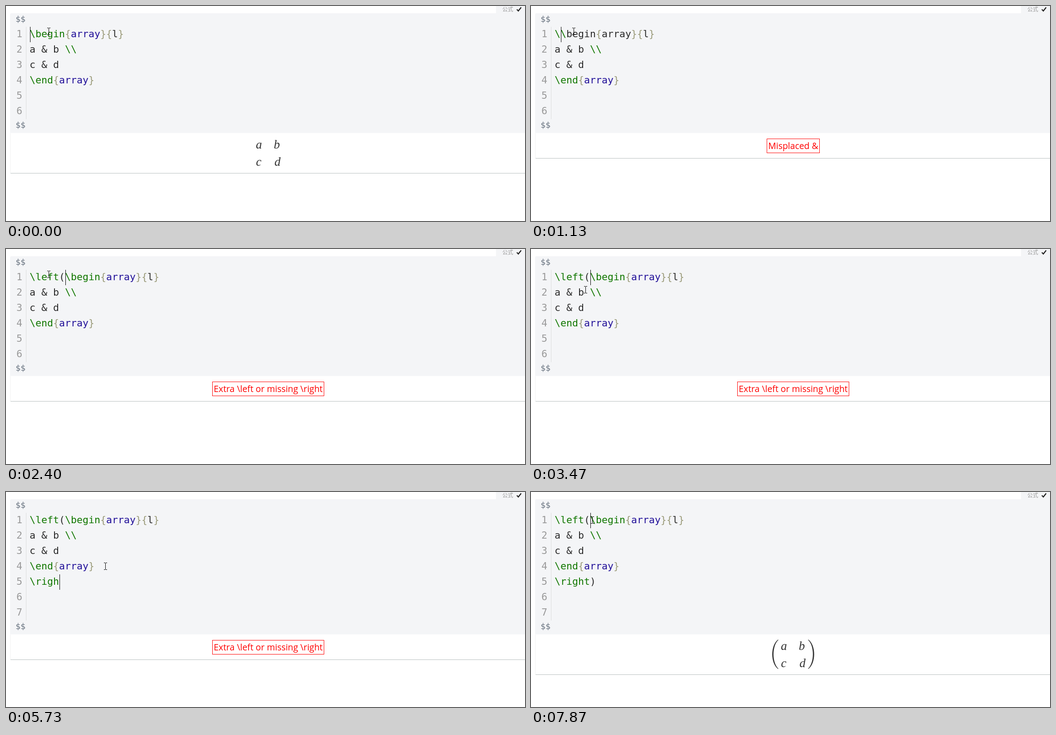
Animation, 1145 px wide and 475 px high, one loop 8000 ms. Source, as an HTML page:

```html
<!DOCTYPE html>
<html lang="en">
<head>
<meta charset="utf-8">
<title>Formula editor</title>
<style>
  html, body { margin: 0; width: 100%; height: 100%; overflow: hidden; background: #fff; }
  svg { display: block; position: absolute; left: 0; top: 0; }
  text { white-space: pre; }
  .code, .num { font: 21.6px "DejaVu Sans Mono", monospace; }
  .code { fill: #2b2b2b; }
  .num { fill: #999; text-anchor: end; }
  .fence { font: 18.3px "DejaVu Sans Mono", monospace; fill: #697480; }
  .tag { fill: #170; }
  .brace { fill: #997; }
  .atom { fill: #219; }
  .var { font: italic 27px "Liberation Serif", serif; fill: #333; text-anchor: middle; }
  .bad { font: 27px "Liberation Serif", serif; fill: #f00; }
  .slash { font-size: 38px; }
  .err { position: absolute; left: 0; right: -12px; width: fit-content; margin: 0 auto;
    box-sizing: border-box; height: 32px; padding: 0 2px; border: 1px solid #f00; color: #f00;
    white-space: pre; font: 19.4px/30px "Open Sans", sans-serif; }
  .label { font: 300 12px "Noto Sans CJK SC", "Noto Sans CJK", sans-serif; fill: #999; }
</style>
</head>
<body>
<svg id="stage" width="1145" height="475" viewBox="0 0 1145 475"></svg>
<div id="err" class="err"></div>
<svg width="1145" height="475" viewBox="0 0 1145 475">
  <path id="mouse" d="M0 0h3v1h-3zM4 0h3v1h-3zM3 1h1v14h-1zM0 15h3v1h-3zM4 15h3v1h-3z"/>
</svg>
<script>
const LOOP = 8000, ROW = 34, TOP = 46, LEFT = 53, CHAR = 13, TICK = 200 / 3;
const stage = document.getElementById('stage');
const errBox = document.getElementById('err');
const mouse = document.getElementById('mouse');

// Each step merges into the state; caret is [row, column] or null.
const steps = [
  [0, { head: '', tail: null, caret: [0, 0] }],
  [330, { head: '\\', caret: [0, 1] }],
  [600, { head: '', caret: [0, 0] }],
  [1130, { head: '\\', caret: [0, 1] }],
  [1330, { head: '\\l', caret: [0, 2] }],
  [1470, { head: '\\le', caret: [0, 3] }],
  [1530, { head: '\\lef', caret: [0, 4] }],
  [1670, { head: '\\left', caret: [0, 5] }],
  [2200, { caret: null }],
  [2400, { head: '\\left(', caret: [0, 6] }],
  [2930, { caret: null }],
  [3470, { caret: [0, 6] }],
  [3930, { caret: [3, 11] }],
  [4530, { caret: null }],
  [4670, { tail: '', caret: [4, 0] }],
  [5200, { caret: null }],
  [5270, { tail: '\\', caret: [4, 1] }],
  [5470, { tail: '\\r', caret: [4, 2] }],
  [5530, { tail: '\\ri', caret: [4, 3] }],
  [5670, { tail: '\\rig', caret: [4, 4] }],
  [5730, { tail: '\\righ', caret: [4, 5] }],
  [5800, { tail: '\\right', caret: [4, 6] }],
  [6330, { caret: null }],
  [6600, { tail: '\\right)', caret: [4, 7] }],
  [7130, { caret: null }],
  [7670, { caret: [4, 7] }],
  [7870, { caret: [0, 6] }]
];

// Pointer strokes: start time, then one position per tick.
const strokes = [
  [0, [[94, 48]]],
  [2930, [[108, 45], [132, 39], [148, 37], [150, 37]]],
  [3270, [[146, 41], [136, 50], [126, 64], [120, 82], [124, 102], [138, 122],
          [160, 138], [184, 149], [203, 155], [214, 156], [217, 156]]],
  [4130, [[219, 156]]],
  [7270, [[222, 157], [224, 155], [220, 146], [208, 130], [192, 112],
          [174, 93], [157, 76], [144, 63], [137, 56], [135, 54]]]
];

const esc = s => s.replace(/&/g, '&amp;');
const span = (cls, s) => `<tspan class="${cls}">${esc(s)}</tspan>`;
const text = (cls, x, y, s) => `<text class="${cls}" x="${x}" y="${y}">${s}</text>`;
const rect = (x, y, w, h, fill) => `<rect x="${x}" y="${y}" width="${w}" height="${h}" fill="${fill}"/>`;

function highlight(line) {
  const rule = /(\\[a-z]+)(?:\{(\w+)\})?|\\\\|[{}]|[^\\{}]+|\\/g;
  return line.replace(rule, (all, cmd, arg) => {
    if (cmd) return span('tag', cmd) + (arg ? span('brace', '{') + span('atom', arg) + span('brace', '}') : '');
    if (all === '\\\\') return span('tag', all);
    return /[{}]/.test(all) ? span('brace', all) : esc(all);
  });
}

function errorFor({ head, tail }) {
  const missing = 'Missing or unrecognized delimiter for ';
  if (head === '\\') return 'Misplaced &';
  if (head === '\\left') return missing + head;
  if (head !== '\\left(' || tail === '\\right)') return '';
  return tail === '\\right' ? missing + tail : 'Extra \\left or missing \\right';
}

function matrix(head, y) {
  const paren = head === '\\left(';
  const bad = paren ? '' : head.slice(1);
  const advance = { l: 7.5, e: 12, f: 8 };
  const width = bad ? [...bad].reduce((w, c) => w + advance[c], 13.5) : 0;
  const shift = width / 2;
  let out = [['a', 558, 34], ['b', 597.5, 34], ['c', 557.5, 72], ['d', 599, 72]]
    .map(([c, x, dy]) => text('var', x + shift, y + dy, c)).join('');
  if (bad) {
    const x = 548 - shift;
    out += text('bad slash', x, y + 58, '\\') + text('bad', x + 13.5, y + 51, bad);
  }
  if (paren) {
    const arc = 'M545 11C528 24 528 63 545 76L545.8 75.2C531.5 62 531.5 25 545.8 11.8Z';
    out += `<g fill="#333" transform="translate(0 ${y})"><path d="${arc}"/>` +
      `<path d="${arc}" transform="translate(1157 0) scale(-1 1)"/></g>`;
  }
  return out;
}

function draw(s) {
  const lines = [s.head + '\\begin{array}{l}', 'a & b \\\\', 'c & d', '\\end{array}', s.tail || ''];
  const rows = s.tail === null ? 6 : 7;
  const end = TOP + rows * ROW;
  const base = end + 31;
  const error = errorFor(s);
  const foot = base + (error ? 55 : 88);

  let out = `<path d="M1145 0H1081V16H12Q9 16 9 19V${base - 0.5}H1145Z" fill="#f4f5f7"/>`;
  out += text('label', 1095, 12, '公式');
  out += '<path d="M1127 7.5L1130.3 11L1136.5 3" fill="none" stroke="#222" stroke-width="2.4"/>';
  out += text('fence', 21, 35, '$$') + text('fence', 21, end + 19, '$$');
  out += rect(44, TOP, 1, rows * ROW, '#ddd');
  for (let i = 0; i < rows; i++) {
    const y = TOP + i * ROW + 23;
    out += text('num', 36, y, i + 1);
    if (lines[i]) out += text('code', LEFT - 1, y, highlight(lines[i]));
  }
  if (s.caret) out += rect(LEFT + s.caret[1] * CHAR, TOP + s.caret[0] * ROW, 1, ROW, '#000');

  out += rect(9, base, 1, foot - base, '#f0f1f2') + rect(10, foot, 1135, 1, '#b9c0c0');
  if (!error) out += matrix(s.head, base);
  stage.innerHTML = out;

  errBox.style.display = error ? 'block' : 'none';
  errBox.style.top = base + 12 + 'px';
  errBox.textContent = error;
}

let shown = -1;
function frame() {
  const t = performance.now() % LOOP;
  const index = steps.filter(([at]) => at <= t).length - 1;
  if (index !== shown) {
    draw(Object.assign({}, ...steps.slice(0, index + 1).map(step => step[1])));
    shown = index;
  }
  const [start, path] = strokes.filter(([at]) => at <= t).pop();
  const k = Math.min(path.length - 1, Math.floor((t - start + 4) / TICK));
  const [x, y] = path[k];
  mouse.setAttribute('transform', `translate(${x - 3} ${y})`);
  requestAnimationFrame(frame);
}
frame();
</script>
</body>
</html>
```
